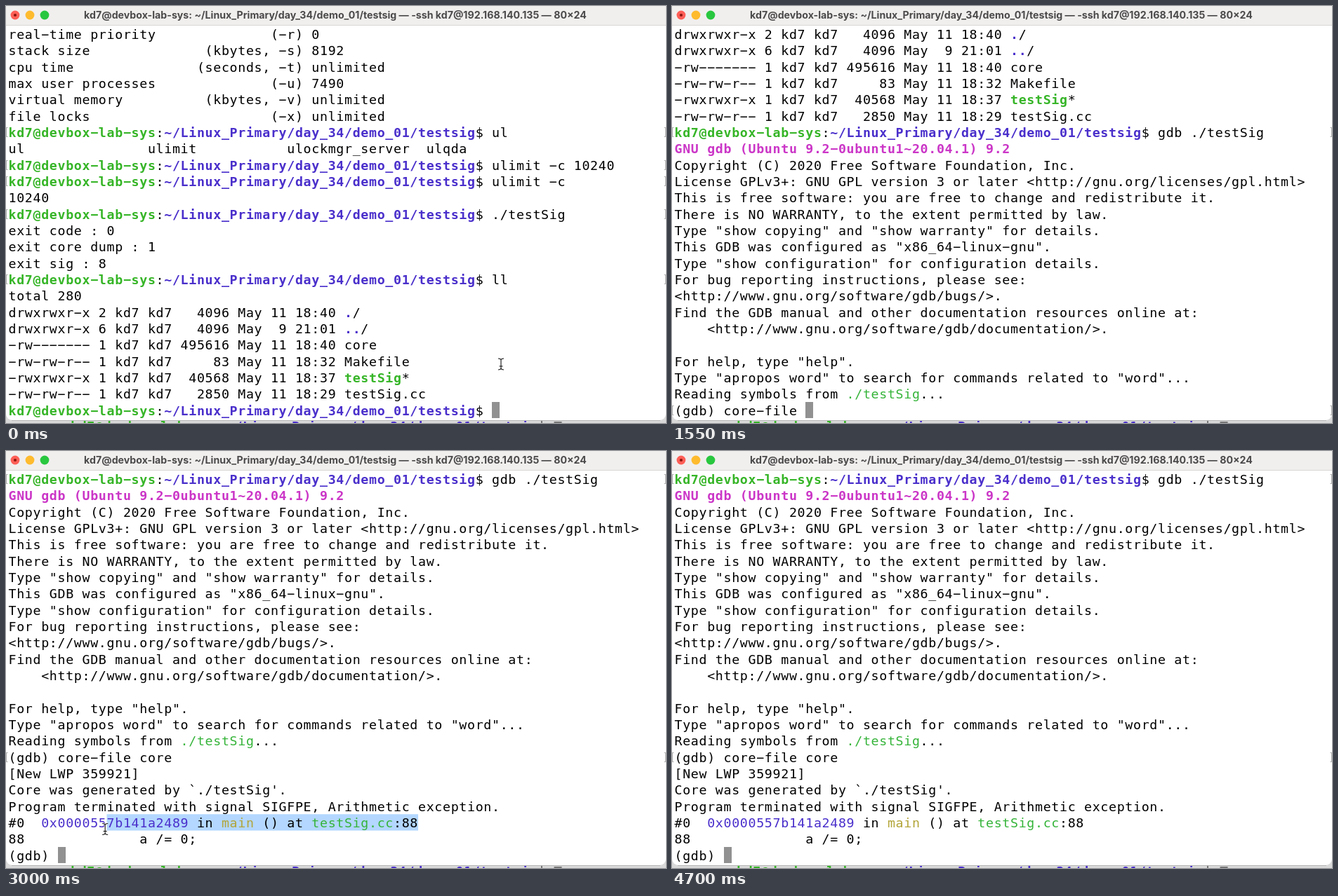
Recreate the animation shown at these times as an HTML page with a canvas. Size 940 by 595 pixels, loop 4750 ms.

```html
<!DOCTYPE html>
<html lang="en">
<head>
<meta charset="utf-8">
<title>Terminal session</title>
<style>
  html, body { margin: 0; width: 100%; height: 100%; overflow: hidden; background: #fff; }
  canvas { display: block; width: 940px; height: 595px; }
</style>
</head>
<body>
<canvas id="stage" width="940" height="595"></canvas>
<script>
const ctx = document.getElementById('stage').getContext('2d');
const LOOP = 4750, TICK = 50;
const W = 940, H = 595, BAR = 28, FLOOR = 591;
const ROWS = 24, LEFT = 3.5, TOP = 28.3, COL = 11.67, ROW = 23.33, BASE = 18.7;
const MONO = '18.3px "DejaVu Sans Mono", monospace';

const USER = 'kd7', HOST = 'devbox-lab-sys';
const DIR = '~/Linux_Primary/day_34/demo_01/testsig';
const TITLE = `${USER}@${HOST}: ${DIR} — -ssh ${USER}@192.168.140.135 — 80×24`;

// A "¦" followed by a letter switches the style within a line.
const STYLES = {
  n: ['#000', ''],
  G: ['#36b527', 'bold '],
  B: ['#4a2fcb', 'bold '],
  M: ['#cb36c7', 'bold '],
  g: ['#36b43a', ''],
  b: ['#4a2fcb', ''],
  y: ['#b2a437', '']
};
const PROMPT = `¦G${USER}@${HOST}¦n:¦B${DIR}¦n$ `;

const limit = (label, flag, value) => label + flag.padStart(36 - label.length) + ' ' + value;
const file = (mode, links, size, date, name) =>
  `${mode} ${links} ${USER} ${USER} ${String(size).padStart(6)} May ${date} ${name}`;

const lines = [
  limit('real-time priority', '(-r)', 0),
  limit('stack size', '(kbytes, -s)', 8192),
  limit('cpu time', '(seconds, -t)', 'unlimited'),
  limit('max user processes', '(-u)', 7490),
  limit('virtual memory', '(kbytes, -v)', 'unlimited'),
  limit('file locks', '(-x)', 'unlimited'),
  PROMPT + 'ul',
  ['ul', 'ulimit', 'ulockmgr_server', 'ulqda'].map(s => s.padEnd(17)).join(''),
  PROMPT + 'ulimit -c 10240',
  PROMPT + 'ulimit -c',
  '10240',
  PROMPT + './testSig',
  'exit code : 0',
  'exit core dump : 1',
  'exit sig : 8',
  PROMPT + 'll',
  'total 280',
  file('drwxrwxr-x', 2, 4096, '11 18:40', '¦B.¦n/'),
  file('drwxrwxr-x', 6, 4096, ' 9 21:01', '¦B..¦n/'),
  file('-rw-------', 1, 495616, '11 18:40', 'core'),
  file('-rw-rw-r--', 1, 83, '11 18:32', 'Makefile'),
  file('-rwxrwxr-x', 1, 40568, '11 18:37', '¦GtestSig¦n*'),
  file('-rw-rw-r--', 1, 2850, '11 18:29', 'testSig.cc'),
  PROMPT,
  '¦MGNU gdb (Ubuntu 9.2-0ubuntu1~20.04.1) 9.2',
  'Copyright (C) 2020 Free Software Foundation, Inc.',
  'License GPLv3+: GNU GPL version 3 or later <http://gnu.org/licenses/gpl.html>',
  'This is free software: you are free to change and redistribute it.',
  'There is NO WARRANTY, to the extent permitted by law.',
  'Type "show copying" and "show warranty" for details.',
  'This GDB was configured as "x86_64-linux-gnu".',
  'Type "show configuration" for configuration details.',
  'For bug reporting instructions, please see:',
  '<http://www.gnu.org/software/gdb/bugs/>.',
  'Find the GDB manual and other documentation resources online at:',
  '    <http://www.gnu.org/software/gdb/documentation/>.',
  '',
  'For help, type "help".',
  'Type "apropos word" to search for commands related to "word"...',
  'Reading symbols from ¦g./testSig¦n...',
  '(gdb) ',
  '[New LWP 359921]',
  "Core was generated by `./testSig'.",
  'Program terminated with signal SIGFPE, Arithmetic exception.',
  '#0  ¦b0x0000557b141a2489¦n in ¦ymain¦n () at ¦gtestSig.cc¦n:88',
  '88'.padEnd(16) + 'a /= 0;',
  '(gdb) '
];
const SHELL = 23, GDB = 40, LAST = 46, FRAME_LINE = 44;
const marked = new Set([6, 8, 9, 11, 15]);

// [time, typed so far]
const shellKeys = [
  [0, ''], [100, 'g'], [200, 'gd'], [250, 'gdb'], [350, 'gdb '], [450, 'gdb .'], [550, 'gdb ./'],
  [600, 'gdb ./t'], [650, 'gdb ./te'], [750, 'gdb ./testSig'], [850, 'gdb ./testSig ']
];
const gdbKeys = [
  [0, ''], [1250, 'c'], [1300, 'co'], [1350, 'cor'], [1500, 'core'], [1550, 'core-file '],
  [2000, 'core-file c'], [2050, 'core-file co'], [2150, 'core-file cor'], [2200, 'core-file core']
];
const BANNER_AT = 1000, CORE_AT = 2350;
const SELECT_AT = 2750, DESELECT_AT = 3500;

// [time, x, y]
const pointer = [
  [2350, 704, 511], [2500, 704, 511], [2700, 590, 535], [2750, 587, 537], [3050, 52, 540],
  [3150, 8, 541], [3300, 35, 543], [3450, 32, 550], [3600, 9, 554], [3700, 150, 530],
  [3800, 393, 493], [4000, 572, 485], [4150, 470, 500], [4300, 602, 510], [4500, 560, 503],
  [4700, 590, 520]
];

const latest = (keys, t) => keys.filter(k => k[0] <= t).pop()[1];

function pointerAt(t) {
  if (t < 100) return [705, 511];
  if (t < CORE_AT || t >= 4700) return null;
  const i = pointer.findIndex(p => p[0] > t);
  const [t0, x0, y0] = pointer[i - 1], [t1, x1, y1] = pointer[i];
  const k = (t - t0) / (t1 - t0);
  return [x0 + (x1 - x0) * k, y0 + (y1 - y0) * k];
}

function rect(color, x, y, w, h) {
  ctx.fillStyle = color;
  ctx.fillRect(x, y, w, h);
}

function dot(color, x, y, r) {
  ctx.fillStyle = color;
  ctx.beginPath();
  ctx.arc(x, y, r, 0, Math.PI * 2);
  ctx.fill();
}

ctx.font = MONO;
const tracking = COL - ctx.measureText('0').width + 'px';

// Draws a styled line and returns its length in columns.
function drawLine(line, x, baseline) {
  let col = 0;
  ctx.textAlign = 'left';
  ctx.letterSpacing = tracking;
  for (const part of ('¦n' + line).split('¦').slice(1)) {
    const [color, weight] = STYLES[part[0]];
    // The terminal's hyphen is as wide as a minus sign.
    const text = part.slice(1).replaceAll('-', '−');
    ctx.font = weight + MONO;
    ctx.fillStyle = color;
    ctx.fillText(text, x + col * COL, baseline);
    col += text.length;
  }
  ctx.letterSpacing = '0px';
  return col;
}

function drawBackdrop() {
  rect('#fff', 0, 0, W, H);
  rect('#d9d9d9', 0, 580, W, 15);
  const end = drawLine(PROMPT, 92, 606);
  rect('#777', 92 + end * COL, 593, 11, 2);
  ctx.fillStyle = '#fff';
  ctx.beginPath();
  ctx.roundRect(0, 0, W, FLOOR, [0, 0, 9, 9]);
  ctx.fill();
  rect('#b4b4b4', 8, FLOOR, W - 16, 1);
}

function drawTitleBar() {
  rect('#f1efee', 0, 0, W, BAR);
  rect('#d8d6d5', 0, BAR - 1, W, 1);
  dot('#fe5f57', 13, 13, 6.4);
  dot('#8a1710', 13, 13, 2.1);
  dot('#febb2e', 34, 13, 6.4);
  dot('#29c73f', 55, 13, 6.4);
  ctx.font = 'bold 14.2px Inter, sans-serif';
  ctx.textAlign = 'center';
  ctx.fillStyle = '#4b4a4a';
  ctx.fillText(TITLE, 469, 17.5);
}

function drawMarks(y) {
  ctx.strokeStyle = '#a9a9a9';
  ctx.lineWidth = 1;
  const top = y + 5.5, bottom = y + 18.5;
  for (const [edge, inner] of [[0.5, 2.5], [939.5, 937.5]]) {
    ctx.beginPath();
    ctx.moveTo(inner, top);
    ctx.lineTo(edge, top);
    ctx.lineTo(edge, bottom);
    ctx.lineTo(inner, bottom);
    ctx.stroke();
  }
}

function drawPointer(x, y) {
  const beam = new Path2D();
  for (const s of [-1, 1]) {
    beam.moveTo(x - 4, y + s * 8);
    beam.quadraticCurveTo(x, y + s * 8, x, y + s * 5.5);
    beam.quadraticCurveTo(x, y + s * 8, x + 4, y + s * 8);
  }
  beam.moveTo(x, y - 6);
  beam.lineTo(x, y + 6);
  beam.moveTo(x - 2.5, y + 3);
  beam.lineTo(x + 2.5, y + 3);
  for (const [color, width] of [['rgba(255,255,255,.8)', 3], ['#111', 1.1]]) {
    ctx.strokeStyle = color;
    ctx.lineWidth = width;
    ctx.stroke(beam);
  }
}

function selectionStart(t) {
  if (t < SELECT_AT || t >= DESELECT_AT) return null;
  if (t >= 3100) return 0;
  return Math.max(0, Math.round((pointerAt(t)[0] - LEFT) / COL));
}

function render(t) {
  const last = t < BANNER_AT ? SHELL : t < CORE_AT ? GDB : LAST;
  const first = last - ROWS + 1;
  const typed = { [SHELL]: latest(shellKeys, t), [GDB]: latest(gdbKeys, t) };
  const from = selectionStart(t);

  drawBackdrop();
  for (let i = first; i <= last; i++) {
    const y = TOP + (i - first) * ROW;
    if (i === FRAME_LINE && from !== null) {
      rect('#b3d7ff', LEFT + from * COL, y, (50 - from) * COL, ROW);
    }
    const end = drawLine(lines[i] + (typed[i] || ''), LEFT, y + BASE);
    if (i === last) rect('#919191', Math.round(LEFT + end * COL), Math.round(y), 11, 23);
    if (marked.has(i) || (i === SHELL && t >= 750) || (i === GDB && t >= 1550)) {
      drawMarks(Math.round(y));
    }
  }
  drawTitleBar();
  const at = pointerAt(t);
  if (at) drawPointer(...at);
}

let start = null;
function frame(now) {
  if (start === null) start = now;
  const t = (now - start) % LOOP;
  render(Math.floor(t / TICK) * TICK);
  requestAnimationFrame(frame);
}
render(0);
requestAnimationFrame(frame);
</script>
</body>
</html>
```
